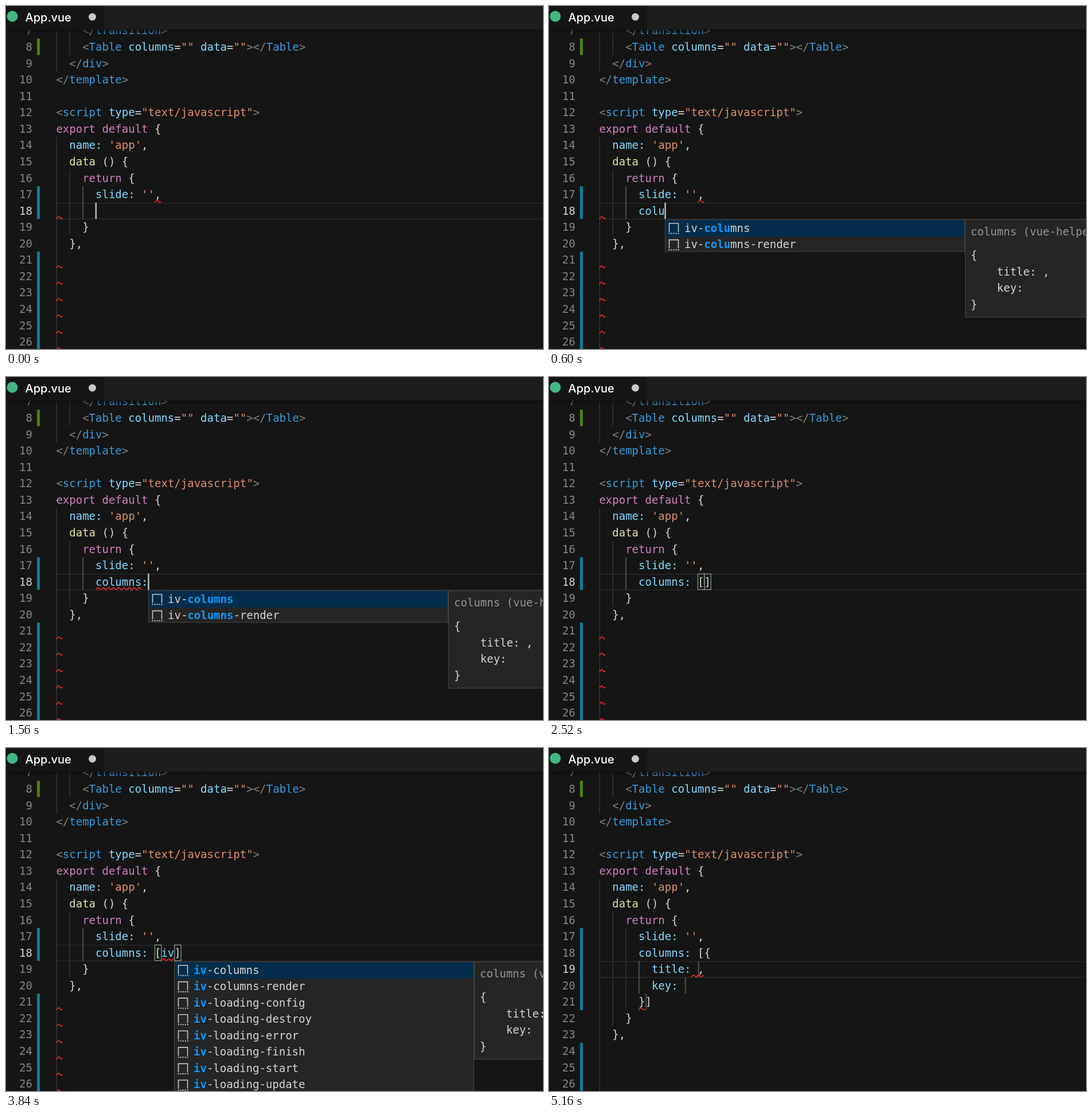
These frames come from a looping animation (936x598 px, 5220 ms). An HTML page:

```html
<!DOCTYPE html>
<html lang="en">
<head>
<meta charset="utf-8">
<title>Editor completion</title>
<style>
  html, body { margin: 0; width: 100%; height: 100%; overflow: hidden; background: #151515; }
  svg { display: block; width: 936px; height: 598px; }
  text { font: 19px "DejaVu Sans Mono", monospace; white-space: pre; fill: #d4d4d4; }
  .tag { fill: #379bdb; }
  .attr { fill: #80d9ff; }
  .str { fill: #de8d6c; }
  .key { fill: #cf7fbd; }
  .fn { fill: #e0dfa8; }
  .dim { fill: #808080; }
  .num { fill: #858585; text-anchor: end; }
  .num.on { fill: #d0d0d0; }
  .hit { fill: #0c98fb; font-weight: bold; }
  .note { fill: #949494; }
  .title { font: 500 20px Inter, sans-serif; fill: #fff; }
  .wave { fill: none; stroke: #e8252a; stroke-width: 1.7; }
  .panel { fill: #252526; stroke: #454545; }
  .match { fill: rgba(0, 100, 0, .1); stroke: #8c8c8c; stroke-width: 1.3; }
</style>
</head>
<body>
<svg viewBox="0 0 936 598">
  <defs>
    <linearGradient id="shade" x2="0" y2="1">
      <stop offset="0" stop-color="#0c0c0c" stop-opacity=".7"/>
      <stop offset="1" stop-color="#0c0c0c" stop-opacity="0"/>
    </linearGradient>
  </defs>
  <rect width="936" height="598" fill="#151515"/>
  <g id="code"></g>
  <rect width="936" height="41" fill="#1d1d1d"/>
  <rect width="171" height="41" fill="#151515"/>
  <rect y="41" width="936" height="8" fill="url(#shade)"/>
  <circle cx="11" cy="18" r="9.5" fill="#41b883"/>
  <text class="title" x="33.5" y="27">App.vue</text>
  <circle cx="150.5" cy="19" r="6.5" fill="#c8c8c8"/>
  <g id="popup"></g>
</svg>
<script>
const LOOP = 5220, STEP = 60, CHAR = 11.438, ROW = 28.565;
const BRACKETS = 1860, ACCEPT = 4860;

// What stands on line 18, and from when
const typing = [
  [0, ''], [180, 'c'], [300, 'co'], [420, 'col'], [540, 'colu'],
  [840, 'colum'], [960, 'column'], [1140, 'columns'], [1380, 'columns:'],
  [1620, 'columns: '], [BRACKETS, 'columns: ['], [2940, 'columns: [i'],
  [3060, 'columns: [iv'], [ACCEPT, '']
];
const snippets = ['columns', 'columns-render', ...['config', 'destroy', 'error',
  'finish', 'start', 'update'].map(s => 'loading-' + s)].map(s => 'iv-' + s);

const head = [
  [4, ['dim', '</'], ['tag', 'transition'], ['dim', '>']],
  [4, ['dim', '<'], ['tag', 'Table'], ['attr', ' columns'], ['', '='], ['str', '""'],
    ['attr', ' data'], ['', '='], ['str', '""'], ['dim', '></'], ['tag', 'Table'], ['dim', '>']],
  [2, ['dim', '</'], ['tag', 'div'], ['dim', '>']],
  [0, ['dim', '</'], ['tag', 'template'], ['dim', '>']],
  [0],
  [0, ['dim', '<'], ['tag', 'script'], ['attr', ' type'], ['', '='],
    ['str', '"text/javascript"'], ['dim', '>']],
  [0, ['key', 'export default'], ['', ' {']],
  [2, ['attr', 'name:'], ['str', " 'app'"], ['', ',']],
  [2, ['fn', 'data'], ['', ' () {']],
  [4, ['key', 'return'], ['', ' {']],
  [6, ['attr', 'slide:'], ['str', " ''"], ['', ',']]
];
const tail = [[4, ['', '}']], [2, ['', '},']]];
const filled = [
  [6, ['attr', 'columns:'], ['', ' [{']],
  [8, ['attr', 'title:'], ['', ' ,']],
  [8, ['attr', 'key:']],
  [6, ['', '}]']]
];

const colX = c => 87.4 + c * CHAR;
const rowY = n => 57 + (n - 8) * ROW;
const esc = s => s.replace(/&/g, '&amp;').replace(/</g, '&lt;').replace(/>/g, '&gt;');
const rect = (x, y, w, h, attrs) =>
  `<rect x="${x}" y="${y}" width="${w}" height="${h}" ${attrs}/>`;
const fill = (x, y, w, h, c) => rect(x, y, w, h, `fill="${c}"`);
const label = (x, y, parts) => `<text x="${x}" y="${y}">` +
  parts.map(([k, s]) => `<tspan class="${k}">${esc(s)}</tspan>`).join('') + '</text>';
const guide = (c, a, b, on) =>
  fill(colX(c) + .3, rowY(a), 1.2, (b - a + 1) * ROW, on ? '#707070' : '#3c3c3c');
const mark = (a, b, color) => fill(54, rowY(a), 5, (b - a + 1) * ROW, color);
const caret = (n, c) => fill(colX(c) - .5, rowY(n), 2.6, ROW, '#b4b5b3');
const match = c => rect(colX(c) + .4, rowY(18) + .6, CHAR, ROW - 1.2, 'class="match"');

function wave(n, c, len) {
  let d = '';
  for (let x = 0; x <= len * CHAR; x++) {
    const y = rowY(n) + 26.3 + 1.8 * Math.cos(x * 2 * Math.PI / 9);
    d += `${d ? 'L' : 'M'}${(colX(c) + x).toFixed(1)} ${y.toFixed(1)}`;
  }
  return `<path class="wave" d="${d}"/>`;
}

function drawCode(t, text, since) {
  const done = t >= ACCEPT;
  const open = t >= BRACKETS && !done;
  const active = done ? 19 : 18;
  const split = text.indexOf('[');
  const typed = split < 0 ? [['attr', text]]
    : [['attr', text.slice(0, split)], ['', '['], ['attr', text.slice(split + 1)], ['', ']']];
  const lines = [...head, ...(done ? filled : [[6, ...typed]]), ...tail];
  const shift = done ? 3 : 0;

  let out = [0, 1].map(i => fill(88, rowY(active) + i * (ROW - 1) + .4, 848, 1.6, '#272727')).join('');
  out += guide(0, 7, 9) + guide(2, 7, 8) + guide(0, 14, 26) + guide(2, 16, 19 + shift)
    + guide(4, 17, 18 + shift, !done) + (done ? guide(6, 19, 20, true) : '');
  out += mark(8, 8, '#4f7f0a') + mark(17, 18 + shift, '#0c7d9d') + mark(21 + shift, 26, '#0c7d9d');
  for (let n = 7; n <= 26; n++)
    out += `<text class="num${n === active ? ' on' : ''}" x="46" y="${rowY(n) + 21}">${n}</text>`;
  if (open) out += match(15) + match(6 + text.length);
  if (done) out += [[19, 15], [20, 13], [21, 7]]
    .map(([n, c]) => fill(colX(c) + .5, rowY(n), 2.5, ROW, '#454545')).join('');
  lines.forEach(([c, ...parts], i) => { out += label(colX(c), rowY(i + 7) + 21, parts); });

  if (!done) for (let n = 21; n <= 26; n++) out += wave(n, 0, 1);
  if (t < 1320) out += wave(17, 15, 1) + wave(18, 0, 1);
  else if (t < 2040) out += wave(18, 6, 7);
  if (t >= 3600 && !done) out += wave(18, 16, 2);
  if (t >= 5040) out += wave(19, 14, 2) + wave(21, 6, 1);

  const lit = done ? t < 5100 : (t - since) % 1000 < 500;
  if (lit) out += done ? caret(19, 15) : caret(18, 6 + text.length);
  return out;
}

function icon(x, y) {
  return `<path d="M${x} ${y + 15}V${y}h16v15" fill="none" stroke="#c5c5c5" stroke-width="1.6"/>` +
    `<path d="M${x - .8} ${y + 17.5}h18" stroke="#c5c5c5" stroke-width="2" stroke-dasharray="2 2"/>`;
}

function scrollbarAlpha(t) {
  if (t < 3060 || t > 3780) return 0;
  return t < 3240 ? (t - 3060) / 180 * .25 : (3780 - t) / 540 * .25;
}

function drawPopup(t, text) {
  const word = text.slice(text.indexOf('[') + 1).replace(':', '');
  const shown = t < ACCEPT && (t >= 2940 || (t >= 300 && t < 1620));
  if (!shown) return '';
  const x = Math.round(colX(6 + text.length)), y = 372.5;
  const items = t < BRACKETS ? snippets.slice(0, 2) : snippets;
  const tall = items.length > 2;
  let out = rect(x + .5, y, 522, tall ? 240 : 55.5, 'class="panel"');
  out += fill(x + 1, 373, 521, 29, '#042d4b');
  items.forEach((name, i) => {
    const at = name.indexOf(word), end = at + word.length;
    const base = rowY(19 + i) + 22.3;
    out += icon(x + 7.5, base - 14.5) + label(x + 34, base,
      [['', name.slice(0, at)], ['hit', name.slice(at, end)], ['', name.slice(end)]]);
  });
  const alpha = scrollbarAlpha(t);
  if (alpha) out += fill(x + 505, 373, 16, 108, `rgba(121,121,121,${alpha.toFixed(3)})`);

  const side = x + 523;
  out += rect(side + .5, y, 500, 170, 'class="panel"');
  out += label(side + 10, 400, [['note', 'columns (vue-helper)']]);
  ['{', '    title: ,', '    key: ', '}'].forEach((s, i) => {
    out += label(side + 10, 441 + i * ROW, [['', s]]);
  });
  return out;
}

const codeLayer = document.getElementById('code');
const popupLayer = document.getElementById('popup');
const start = performance.now();
let last = -1;

function frame() {
  const t = Math.floor((performance.now() - start) % LOOP / STEP) * STEP;
  if (t !== last) {
    last = t;
    const [since, text] = typing.filter(s => s[0] <= t).pop();
    codeLayer.innerHTML = drawCode(t, text, since);
    popupLayer.innerHTML = drawPopup(t, text);
  }
  requestAnimationFrame(frame);
}
frame();
</script>
</body>
</html>
```
